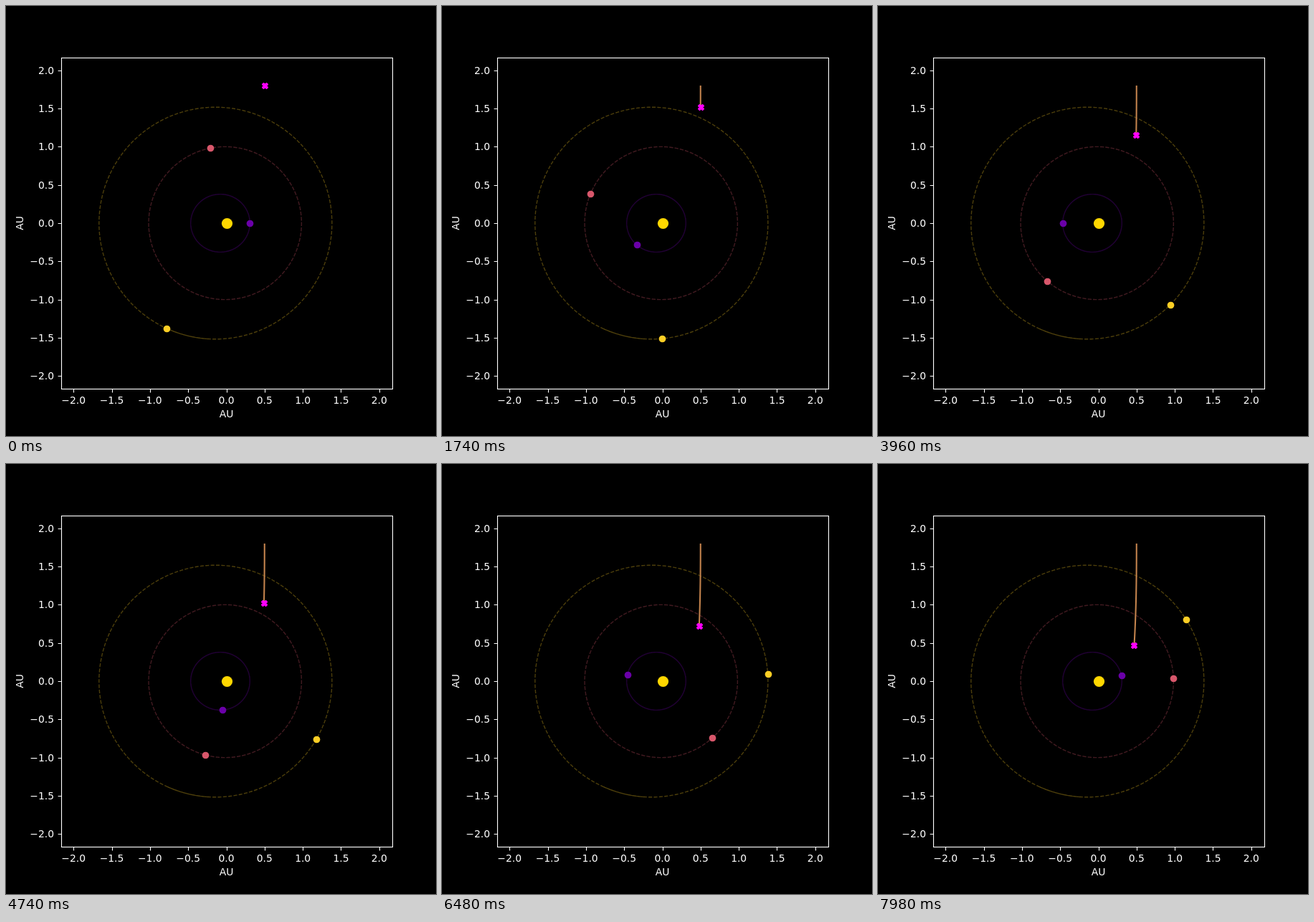
These frames come from a looping animation (600 px wide and 600 px high, 8000 ms). An HTML page with a canvas:

```html
<!DOCTYPE html>
<html lang="en">
<head>
<meta charset="utf-8">
<title>Inner orbits</title>
<style>
  html, body { margin: 0; width: 100%; height: 100%; overflow: hidden; background: #000; }
  canvas { display: block; width: 600px; height: 600px; }
</style>
</head>
<body>
<canvas id="stage" width="600" height="600"></canvas>
<script>
const ctx = document.getElementById('stage').getContext('2d');

const LOOP = 8000, STEP = 30;       // ms; one step is one day
const LAST_DAY = Math.floor((LOOP - 1) / STEP);
const ORBIT_DAYS = 730;
const CX = 307.5, CY = 303, AU = 106.66;
const PT = 100 / 72;                // pixels per point
const TAU = 2 * Math.PI;

const planets = [
  { a: 0.3871, e: 0.2056, period: 87.97,  start: 0,   color: '#6a00a8' },
  { a: 1.0,    e: 0.0167, period: 365.25, start: 100, color: '#d8576b' },
  { a: 1.5237, e: 0.0934, period: 686.98, start: 250, color: '#fcce25' },
];

// Kepler orbit with the perihelion on the +x axis
function planetAt({ a, e, period, start }, day) {
  const mean = (start / 360 + day / period) * TAU;
  let E = mean;
  for (let i = 0; i < 8; i++) E -= (E - e * Math.sin(E) - mean) / (1 - e * Math.cos(E));
  return [
    CX + AU * a * (Math.cos(E) - e),
    CY - AU * a * Math.sqrt(1 - e * e) * Math.sin(E),
  ];
}

function probeAt(day) {
  const u = day / LAST_DAY;
  return [360.75 - 3.3 * u ** 2.6, 111 + 0.513 * day + 5.9 * u * u];
}

const snap = v => Math.floor(v + 0.5) + 0.5;

function tracePath(position, days) {
  ctx.beginPath();
  for (let d = 0; d <= days; d++) ctx.lineTo(...position(d));
}

function dot([x, y], radius, color) {
  ctx.fillStyle = color;
  ctx.beginPath();
  ctx.arc(snap(x), snap(y), radius, 0, TAU);
  ctx.fill();
}

function cross([x, y], unit, color) {
  const arm = [[-1, 2], [0, 1], [1, 2]];
  ctx.save();
  ctx.translate(snap(x), snap(y));
  ctx.beginPath();
  for (let i = 0; i < 4; i++) {
    for (const [px, py] of arm) ctx.lineTo(px * unit, py * unit);
    ctx.rotate(-Math.PI / 2);
  }
  ctx.closePath();
  ctx.fillStyle = ctx.strokeStyle = color;
  ctx.lineWidth = PT;
  ctx.lineJoin = 'bevel';
  ctx.fill();
  ctx.stroke();
  ctx.restore();
}

function drawOrbits() {
  ctx.save();
  ctx.globalAlpha = 0.3;
  ctx.lineWidth = PT;
  ctx.setLineDash([3.7 * PT, 1.6 * PT]);
  for (const p of planets) {
    ctx.strokeStyle = p.color;
    tracePath(d => planetAt(p, d), ORBIT_DAYS);
    ctx.stroke();
  }
  ctx.restore();
}

function drawAxes() {
  ctx.strokeStyle = ctx.fillStyle = '#fff';
  ctx.lineWidth = 0.8 * PT;
  ctx.font = `${10 * PT}px "DejaVu Sans", sans-serif`;
  ctx.strokeRect(77.5, 72.5, 462, 462);

  ctx.beginPath();
  for (let v = -2; v <= 2; v += 0.5) {
    const x = snap(CX + v * AU), y = snap(CY - v * AU);
    const label = v.toFixed(1).replace('-', '\u2212');
    ctx.moveTo(x, 534.5);
    ctx.lineTo(x, 539.4);
    ctx.moveTo(77.5, y);
    ctx.lineTo(72.6, y);
    ctx.textAlign = 'center';
    ctx.fillText(label, CX + v * AU, 555);
    ctx.textAlign = 'right';
    ctx.fillText(label, 67, Math.floor(y) + 5);
  }
  ctx.stroke();

  ctx.textAlign = 'center';
  ctx.fillText('AU', CX, 574);
  ctx.save();
  ctx.translate(24, CY);
  ctx.rotate(-Math.PI / 2);
  ctx.fillText('AU', 0, 0);
  ctx.restore();
}

// Everything that stays still is painted once
ctx.fillStyle = '#000';
ctx.fillRect(0, 0, 600, 600);
drawOrbits();
drawAxes();
const backdrop = document.createElement('canvas');
backdrop.width = backdrop.height = 600;
backdrop.getContext('2d').drawImage(ctx.canvas, 0, 0);

function draw(day) {
  ctx.drawImage(backdrop, 0, 0);
  dot([CX, CY], 7.6, '#ffd700');
  for (const p of planets) dot(planetAt(p, day), 4.86, p.color);

  ctx.strokeStyle = '#c3834d';
  ctx.lineWidth = 1.5 * PT;
  tracePath(probeAt, day);
  ctx.stroke();
  cross(probeAt(day), 2, '#f0f');
}

const began = performance.now();
function tick() {
  draw(Math.floor(((performance.now() - began) % LOOP) / STEP));
  requestAnimationFrame(tick);
}
tick();
</script>
</body>
</html>
```
